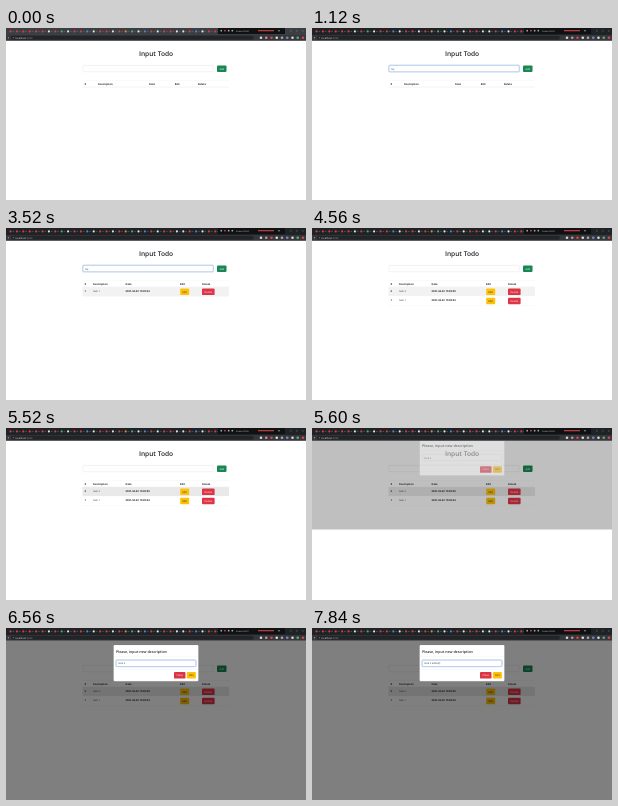
These frames come from a looping animation (300x172 px, 8 s). An HTML page:

```html
<!DOCTYPE html>
<html lang="en">
<head>
<meta charset="utf-8">
<title>Input Todo</title>
<style>
  html, body { margin: 0; width: 100%; height: 100%; overflow: hidden; background: #fff; }
  svg { display: block; width: 300px; height: 172px; }
  text { font: 2.55px "Open Sans", "Noto Sans", sans-serif; fill: #212529; text-rendering: geometricPrecision; white-space: pre; }
</style>
</head>
<body>
<svg id="stage" viewBox="0 0 300 172" xmlns="http://www.w3.org/2000/svg"></svg>
<script>
const LOOP = 8000, STEP = 80;
const COLORS = {
  green: "#198754", yellow: "#ffc107", red: "#dc3545",
  border: "#ced4da", focus: "#8cb0dc", line: "#dee2e6"
};
const stage = document.getElementById("stage");

const rect = (x, y, w, h, fill, extra = "") =>
  `<rect x="${x}" y="${y}" width="${w}" height="${h}" fill="${fill}" ${extra}/>`;
const text = (x, y, s, style = "", anchor = "start") =>
  `<text x="${x}" y="${y}" text-anchor="${anchor}" style="${style}">${s}</text>`;
const dot = (x, y, r, fill) => `<circle cx="${x}" cy="${y}" r="${r}" fill="${fill}"/>`;
const bold = (x, y, s) => text(x, y, s, "font-weight:700");

function button(x, y, w, label, fill, ink = "#fff") {
  return rect(x, y, w, 6.5, fill, 'rx=".9"') +
    text(x + w / 2, y + 4.15, label, `fill:${ink};font-weight:500`, "middle");
}

// Latest entry of [time, value] pairs that has been reached.
function at(t, keys) {
  let value = keys[0][1];
  for (const [time, next] of keys) if (t >= time) value = next;
  return value;
}

const ramp = (t, from, to) => Math.max(0, Math.min(1, (t - from) / (to - from)));

function field(x, y, w, value, focus, caret) {
  const glow = focus ? rect(x - .4, y - .4, w + .8, 7.1, "none",
    `rx="1.2" stroke="#0d6efd" stroke-width=".8" stroke-opacity="${.2 * focus}"`) : "";
  const frame = rect(x, y, w, 6.3, "#fff",
    `rx=".8" stroke="${COLORS.border}" stroke-width=".3"`) +
    (focus ? rect(x, y, w, 6.3, "none",
      `rx=".8" stroke="${COLORS.focus}" stroke-width=".45" stroke-opacity="${focus}"`) : "");
  const mark = caret ? '<tspan style="fill:#222">|</tspan>' : "";
  return glow + frame + text(x + 2, y + 4.15, value + mark, "fill:#343a40");
}

const TABS = "rrrrrrwrgwrrbwrrwrogwbrwrrwwrbwrr";
const TAB_COLORS = { r: "#d93a3e", w: "#e4e5e7", g: "#55a579", b: "#5583c5", o: "#d98b43" };
const TOOLS = ["#d6d7d9", "#d58a9b", "#d54848", "#e0e0e2", "#a7a9ad", "#7d83c0", "#d7d7d7", "#5aaa83", "#d54848"];

function browser(t) {
  const strip = t < 80 ? "#3b3e42" : "#202326";
  let out = rect(0, 0, 300, 7, strip) + rect(0, 7, 300, 5.8, "#35373b");
  [...TABS].forEach((key, i) => {
    const x = 4.5 + i * 6.4;
    out += dot(x, 3.4, 1.05, TAB_COLORS[key]) + rect(x + 2, 3.1, 1.6, .45, "#777b80");
  });
  out += rect(4.8, 7.8, 243, 4, "#222428", 'rx="2"') +
    dot(2.5, 9.8, .7, "#8d9095") + dot(7.3, 9.8, .55, "#a0a2a6") +
    text(9.4, 10.7, 'localhost<tspan style="fill:#8f9297">:3000</tspan>', "fill:#e8eaed");
  TOOLS.forEach((fill, i) => { out += dot(255 + i * 5.25, 9.8, 1.3, fill); });
  out += rect(212, 0, 67, 6, "#101113");
  for (let i = 0; i < 4; i++) out += rect(214.5 + i * 3.7, 1.9, 1.5, 1.6, i === 1 ? "#c44d4d" : "#a7a9ac");
  const second = [80, 960, 1920, 3200, 4320, 5440, 6480, 7440].filter(n => t >= n).length;
  out += text(230, 3.7, `Screen 00:0${second}`, "font-size:2.15px;fill:#d4d5d7") +
    rect(252, 2, 16, 1.3, "#b83b3b") + dot(273, 2.7, .7, "#b9bbbd");
  [284, 290, 296].forEach(x => { out += rect(x, 2.8, 1.6, .35, "#b8babd"); });
  return out;
}

function taskRow(y, task, date, fill) {
  return rect(76.5, y, 146.5, 9.1, fill) +
    rect(76.5, y + 9, 146.5, .2, COLORS.line) +
    bold(78.5, y + 5, task.slice(-1)) +
    text(87, y + 5, task, "fill:#343a40") +
    bold(119.5, y + 5, date) +
    button(174.2, y + 1.5, 9, "Edit", COLORS.yellow, "#212529") +
    button(196, y + 1.5, 12.6, "Delete", COLORS.red);
}

function page(t) {
  const second = t >= 4480, first = t >= 2480;
  const value = at(t, [
    [0, ""], [1120, "ta"], [1360, "tas"], [1440, "task"], [1520, "task 1"],
    [2480, ""], [3440, "t"], [3520, "ta"], [3600, "tas"], [3680, "task"], [3840, "task 2"], [4480, ""]
  ]);
  const focus = t < 2400 ? ramp(t, 640, 800)
    : t < 3280 ? 1 - ramp(t, 2400, 2560)
    : t < 4400 ? ramp(t, 3280, 3440)
    : 1 - ramp(t, 4400, 4560);
  const caret = focus === 1 && !(t >= 1920 && t < 2160) && !(t >= 4160 && t < 4320);
  const columns = first ? [78.5, 87, 119.5, 174, 196] : [78.5, 92, 143, 168.7, 191.7];
  let out = rect(0, 12.8, 300, 160, "#fff") +
    text(150, 27.8, "Input Todo", "font-size:6.6px;font-weight:600", "middle") +
    field(77, 37.4, 130.2, value, focus, caret) +
    button(211, 37.4, 9.5, "Add", COLORS.green) +
    rect(76.5, 52.3, 146.5, .2, COLORS.line) +
    rect(76.5, 58.9, 146.5, .25, "#c9cccf");
  ["#", "Description", "Date", "Edit", "Delete"].forEach((s, i) => { out += bold(columns[i], 56.7, s); });
  if (second) {
    out += taskRow(59.1, "task 2", "2021-04-22 15:09:09", t >= 4880 ? "#e9e9e9" : "#f2f2f2") +
      taskRow(68.2, "task 1", "2021-04-22 15:09:04", "#fff");
  } else if (first) {
    out += taskRow(59.1, "task 1", "2021-04-22 15:09:04", "#f2f2f2");
  }
  return out;
}

function modal(t) {
  if (t < 5600) return "";
  const opening = t < 5680;
  const value = at(t, [
    [0, "task 2"], [7120, "task 2 "], [7200, "task 2 e"], [7280, "task 2 ed"],
    [7440, "task 2 edi"], [7600, "task 2 edit"], [7680, "task 2 edite"], [7840, "task 2 edited"]
  ]);
  const focus = ramp(t, 6080, 6240);
  const caret = focus === 1 && !(t >= 6480 && t < 6800);
  return rect(0, 12.8, 300, opening ? 88.7 : 160, "#000", `fill-opacity="${opening ? .25 : .5}"`) +
    `<g clip-path="url(#view)"><g opacity="${opening ? .5 : 1}" transform="translate(0 ${opening ? -5.8 : 0})">` +
    rect(107.6, 17, 84.8, 36.2, "#fff", 'rx="1" stroke="#000" stroke-opacity=".2" stroke-width=".2"') +
    text(110, 24.6, "Please, input new description", "font-size:3.6px;font-weight:600") +
    rect(107.8, 28.5, 84.4, .2, COLORS.line) +
    field(110.2, 32.2, 79.6, value, focus, caret) +
    rect(107.8, 41.8, 84.4, .2, COLORS.line) +
    button(168, 44.1, 11.5, "Close", COLORS.red) +
    button(180.9, 44.1, 9, "Edit", COLORS.yellow, "#212529") + "</g></g>";
}

let shown = -1;
function draw(now) {
  const t = Math.floor((now % LOOP) / STEP) * STEP;
  if (t !== shown) {
    shown = t;
    stage.innerHTML = '<clipPath id="view"><rect y="12.8" width="300" height="160"/></clipPath>' +
      page(t) + modal(t) + browser(t);
  }
}

let start;
function tick(now) {
  start ??= now;
  draw(now - start);
  requestAnimationFrame(tick);
}
draw(0);
requestAnimationFrame(tick);
</script>
</body>
</html>
```
